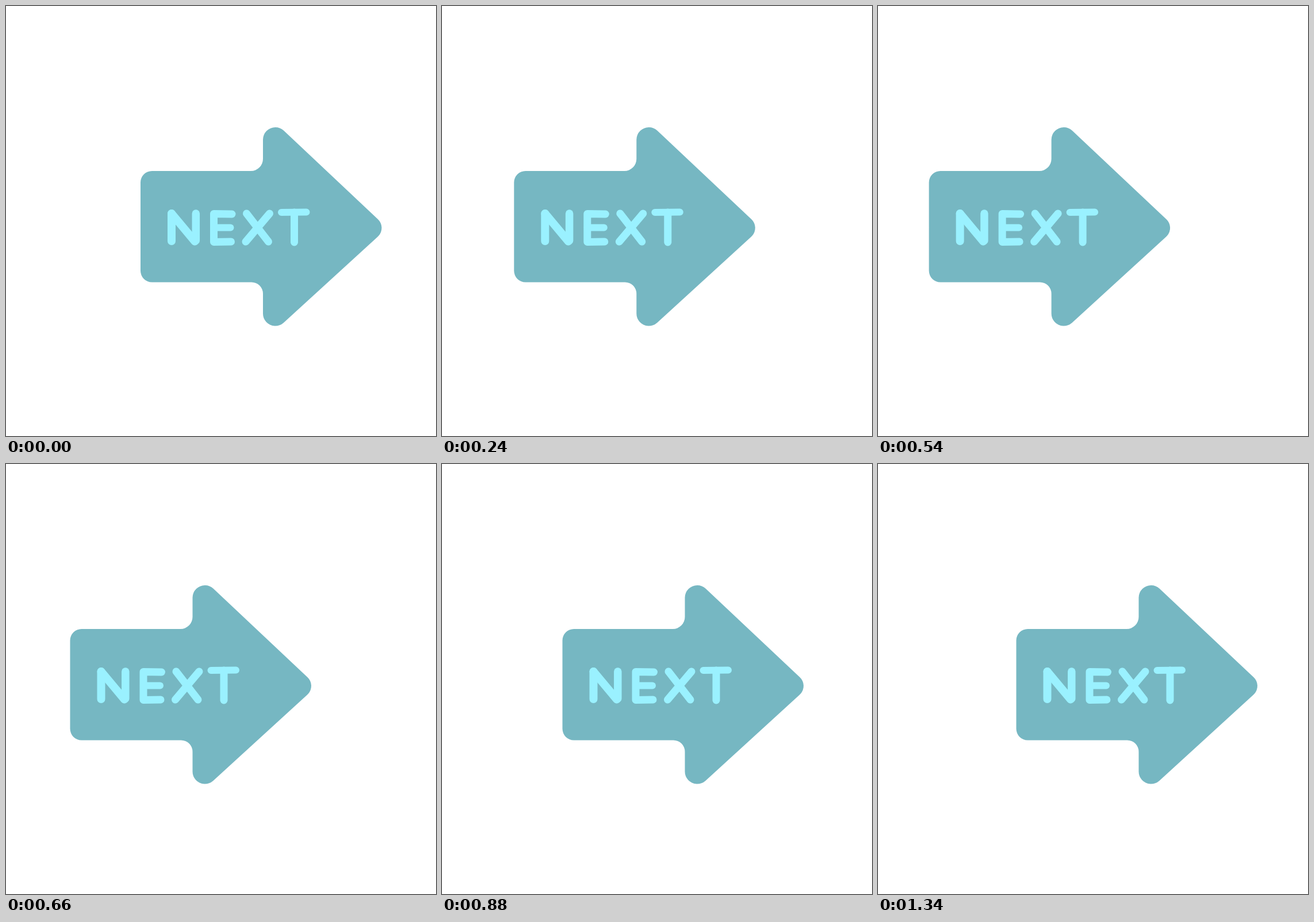
Recreate the animation shown at these times as an HTML page with a canvas. Size 748 px wide and 748 px high, loop 1360 ms.

```html
<!DOCTYPE html>
<html lang="en">
<head>
<meta charset="utf-8">
<title>Next</title>
<style>
  html, body { margin: 0; width: 100%; height: 100%; overflow: hidden; background: #fff; }
  canvas { display: block; width: 748px; height: 748px; }
</style>
</head>
<body>
<canvas id="stage" width="748" height="748" role="img" aria-label="NEXT"></canvas>
<script>
const ctx = document.getElementById('stage').getContext('2d');
const LOOP = 1360, STEP = 20;

// [time in ms, left edge of the arrow]
const keys = [
  [40, 211], [120, 172.5], [380, 91.5], [470, 85], [560, 91], [660, 111.5], [770, 156],
  [880, 209.5], [970, 242.6], [1060, 260], [1145, 264.5], [1340, 240.5], [1360, 234]
];

const slope = (a, b) => (b[1] - a[1]) / (b[0] - a[0]);

function tangent(i) {
  const k = keys[i], prev = keys[i - 1], next = keys[i + 1];
  if (!prev) return slope(k, next);
  if (!next) return slope(prev, k);
  const before = k[0] - prev[0], after = next[0] - k[0];
  return (slope(prev, k) * after + slope(k, next) * before) / (before + after);
}

// Cubic Hermite curve through the keys; the arrow rests at the loop start.
function leftEdge(t) {
  if (t < keys[0][0]) return 234;
  let i = 0;
  while (t > keys[i + 1][0]) i++;
  const [t0, x0] = keys[i], [t1, x1] = keys[i + 1];
  const d = t1 - t0, u = (t - t0) / d, v = 1 - u;
  return x0 * (1 + 2 * u) * v * v + x1 * u * u * (3 - 2 * u)
    + d * u * v * (tangent(i) * v - tangent(i + 1) * u);
}

function arrow() {
  const wing = 21.5, tip = 20.5, r = 20;
  const cx = 234.5, top = 232.5, bottom = 535, tipX = 399, tipY = 386;
  const upper = Math.atan2(tipY - top, tipX - cx) - Math.PI / 2;
  const lower = Math.atan2(bottom - tipY, cx - tipX) - Math.PI / 2;
  ctx.beginPath();
  ctx.moveTo(0, 384);
  ctx.arcTo(0, 287, 100, 287, r);
  ctx.arcTo(213, 287, 213, 240, r + 1);
  ctx.arc(cx, top, wing, Math.PI, upper + 2 * Math.PI);
  ctx.arc(tipX, tipY, tip, upper, lower);
  ctx.arc(cx, bottom, wing, lower, Math.PI);
  ctx.arcTo(213, 480.5, 100, 480.5, r);
  ctx.arcTo(0, 480.5, 0, 384, r);
  ctx.closePath();
  ctx.fillStyle = '#76b7c2';
  ctx.fill();
}

function stroke(width, ...points) {
  ctx.lineWidth = width;
  ctx.beginPath();
  for (const [x, y] of points) ctx.lineTo(x, y);
  ctx.stroke();
}

function word() {
  ctx.strokeStyle = '#9af1ff';
  ctx.lineCap = ctx.lineJoin = 'round';
  // N
  stroke(14, [54, 361], [54, 409]);
  stroke(14, [54, 361], [94.5, 409.5]);
  stroke(13.5, [96.3, 361], [96.3, 408]);
  // E
  stroke(13, [159, 362], [127.5, 361.5], [127.5, 410.5], [157.5, 410]);
  stroke(12, [127.5, 385.5], [156.5, 385.5]);
  // X
  stroke(13, [184.5, 361], [222.5, 410]);
  stroke(13, [224.5, 361], [183, 410]);
  // T
  stroke(12, [245, 359], [288.5, 358.5]);
  stroke(13, [267.5, 359], [267.5, 411]);
}

function frame(now) {
  const t = Math.floor((now % LOOP) / STEP) * STEP;
  ctx.setTransform(1, 0, 0, 1, 0, 0);
  ctx.fillStyle = '#fff';
  ctx.fillRect(0, 0, 748, 748);
  ctx.translate(leftEdge(t), 0);
  arrow();
  word();
}

let start;
function tick(now) {
  start ??= now;
  frame(now - start);
  requestAnimationFrame(tick);
}
frame(0);
requestAnimationFrame(tick);
</script>
</body>
</html>
```
